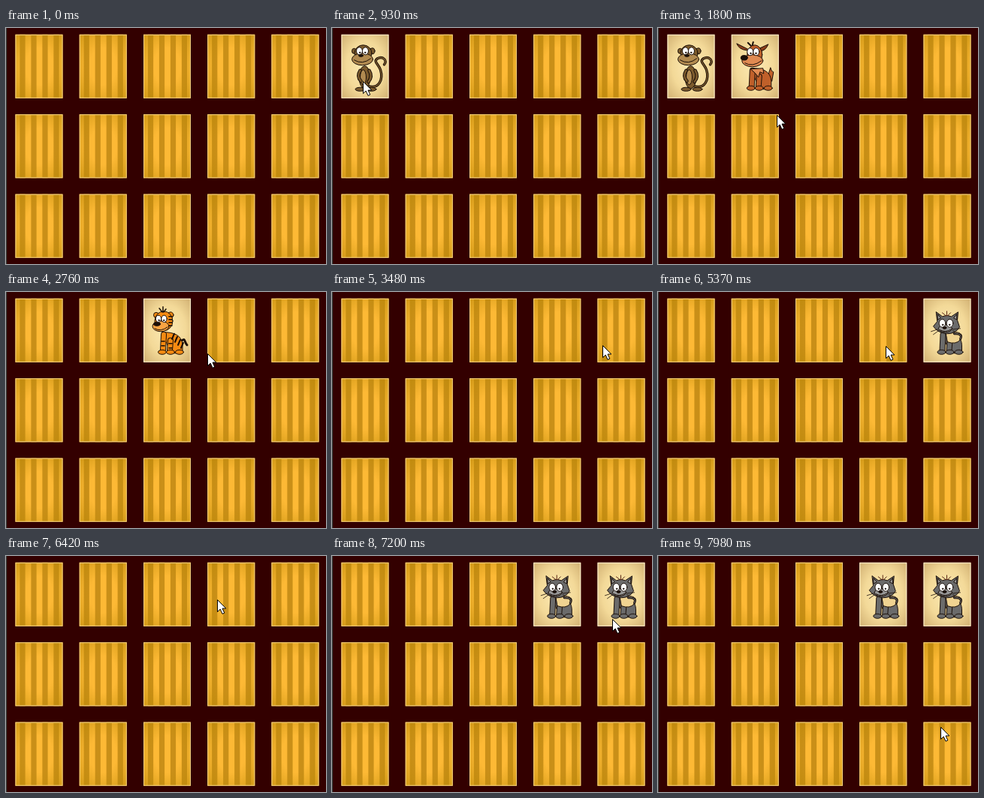
An HTML page for the animation above (8 s loop, 426 by 315 pixels).

```html
<!DOCTYPE html>
<html lang="en">
<head>
<meta charset="utf-8">
<title>Memory cards</title>
<style>
  html, body { margin: 0; width: 100%; height: 100%; overflow: hidden; background: #330000; }
  svg { display: block; width: 100vw; height: 100vh; }
  .art { stroke: #1b0f08; stroke-linejoin: round; stroke-linecap: round; }
</style>
</head>
<body>
<svg viewBox="0 0 426 315">
  <defs>
    <radialGradient id="paper" r=".72">
      <stop offset="0" stop-color="#fdeab4"/>
      <stop offset=".55" stop-color="#f3d998"/>
      <stop offset="1" stop-color="#cfae70"/>
    </radialGradient>
    <radialGradient id="shade" r=".72">
      <stop offset=".4" stop-color="#c08c08" stop-opacity="0"/>
      <stop offset="1" stop-color="#b88604" stop-opacity=".65"/>
    </radialGradient>
  </defs>
  <rect width="426" height="315" fill="#330000"/>
  <rect width="1" height="315" fill="#3b4440"/>
  <g id="cards"></g>
  <path id="cursor" d="M.5 .5V16.5L4.2 13L7 19.3L9.8 18L7 12H11.8Z" fill="#fff" stroke="#000"/>
</svg>
<script>
const LOOP = 8000, FLIP = 90, MISMATCH_DELAY = 540, LONGEST_MOVE = 480;
const CARD = { width: 63, height: 85, columnStep: 85.25, rowStep: 106.5, left: 12.5, top: 8.75 };
const INK = "#1b0f08";

// Drawing helpers
const oval = (x, y, rx, ry, fill) => `<ellipse cx="${x}" cy="${y}" rx="${rx}" ry="${ry}" fill="${fill}"/>`;
const shape = (d, fill) => `<path d="${d}" fill="${fill}"/>`;
const line = (d, width = 1, color = INK) =>
  `<path d="${d}" fill="none" stroke="${color}" stroke-width="${width}"/>`;
const limb = (d, width, color) => line(d, width + 2) + line(d, width, color);
const eyes = (x, y, gap, size = 4) => [x, x + gap].map((ex, i) =>
  oval(ex, y, size, size * 1.25, "#fff") + oval(ex + .6 - i, y + 2, .7, .8, INK)).join("");
const sitting = (x, fill) =>
  shape(`M${x - 3} 45Q${x + 23} 44 ${x + 24} 62V73H${x + 9}Z`, fill) +
  [[8, 56], [-1, 48]].map(([dx, y]) => limb(`M${x + dx} ${y}L${x + dx - 1} 69`, 6, fill)).join("") +
  [20, 8, -3].map(dx => oval(x + dx, 71.5, 5.5, 3, fill)).join("");

const animals = {
  monkey() {
    const fur = "#7c5b2d", skin = "#b18a50";
    return limb("M36 69C50 73 56 60 52 47C49 39 42 36 48 32C55 28 62 35 57 40", 1.4, fur) +
      oval(31, 57, 7.5, 15, fur) + oval(29, 57, 4, 10, skin) +
      limb("M25 48Q20 56 26 62M37 48Q42 56 36 63", 2.5, fur) +
      oval(25, 73, 6.5, 2.5, fur) + oval(40, 73, 6.5, 2.5, fur) +
      oval(17, 22, 3, 3.5, fur) + oval(41, 22, 3.5, 4, fur) +
      oval(29, 25, 11.5, 11, fur) + oval(28, 33, 14, 8, skin) +
      eyes(24, 22, 8) + oval(26, 28, 3, 1.6, INK) + line("M17 34Q28 41 39 32");
  },
  dog() {
    const fur = "#c0602a", dark = "#8d3f1c", pale = "#e08a52";
    return shape("M48 58Q50 50 52 44Q53 50 56 50L54 62Z", fur) + sitting(29, fur) +
      shape("M26 46L42 45L43 52L38 50L36 57L32 52Z", pale) +
      shape("M23 20L7 12Q10 20 20 21ZM36 19L49 13Q45 23 37 22Z", dark) +
      oval(31, 27, 10, 13, fur) + oval(28, 35, 14, 8, pale) +
      eyes(25, 23, 8) + oval(17, 31, 4.5, 3.2, INK) +
      line("M18 38Q28 44 40 35") + line("M26 15L22 11M28 14L29 10", 2);
  },
  tiger() {
    const fur = "#f58a12", stripes = [0, 1, 2, 3];
    return line("M50 57C56 51 54 58 58 62", 3) + sitting(28, fur) +
      stripes.map(i => line(`M${41 + i * 4} ${47 + i * 4}l-3 7`, 2)).join("") +
      stripes.map(i => line(`M${24 + i % 2 * 10} ${57 + i * 3}h4`, 1.7)).join("") +
      oval(17, 22, 3.5, 3.5, fur) + oval(36, 22, 4, 4, fur) +
      oval(27, 30, 12, 13, fur) + oval(23, 37, 11, 7, "#f9a443") +
      eyes(20, 27, 7.5, 3.7) + oval(18, 34, 4.5, 2.4, INK) +
      line("M15 40Q23 45 32 38") + line("M25 18L21 13M26 18V11M27 18L30 14", 1.5) +
      stripes.map(i => line(`M34 ${24 + i * 4}h4`, 1.7)).join("");
  },
  cat() {
    const fur = "#6b6b6b", pale = "#969696";
    return sitting(27, fur) + shape("M30 46Q52 44 49 55Q43 62 32 58Z", "#f0d391") +
      limb("M41 47Q53 46 49 54", 1, fur) +
      shape("M17 18L25 24Q31 21 37 24L46 18L45 29L48 38Q43 47 31 47Q19 46 13 37L18 31Z", fur) +
      shape("M19 21L23 26L19 28ZM44 21L40 26L44 28Z", pale) + oval(29, 40, 9, 5, pale) +
      eyes(25, 33, 10, 4.3) + oval(28, 39, 2.5, 1.6, INK) + line("M22 42Q29 46 37 41") +
      line("M19 41L10 44M20 43L13 48M39 41L49 40M39 43L48 46", .8) +
      line("M30 23L25 19M31 23V17M32 23L36 19", 1, "#5c2815");
  }
};

const frame = (fill, border, inside) =>
  `<rect width="${CARD.width}" height="${CARD.height}" fill="${fill}"/>${inside}
   <rect x=".5" y=".5" width="${CARD.width - 1}" height="${CARD.height - 1}" fill="none" stroke="${border}"/>`;
const backArt = frame("#fdb935", "#f0d082",
  line("M9.5 0V85m15 0V0m15 0V85m15 0V0", 7.2, "#c98f18") +
  `<rect width="${CARD.width}" height="${CARD.height}" fill="url(#shade)"/>`);
const frontArt = name => frame("url(#paper)", "#fff3d2", `<g class="art">${animals[name]()}</g>`);

// Pointer script: it turns a card over wherever it picks one.
const corner = i => ({
  x: CARD.left + i % 5 * CARD.columnStep,
  y: CARD.top + Math.floor(i / 5) * CARD.rowStep
});
const move = (time, x, y) => ({ time, x, y });
const pick = (time, card) => ({ time, card, x: corner(card).x + 20, y: corner(card).y + 62 });
const stops = [
  move(90, 331, 167), move(255, -14, 121), move(410, -12, 93),
  pick(780, 0), pick(1320, 1), move(1800, 158, 116),
  pick(2400, 2), move(2760, 268, 82), pick(2835, 3),
  pick(3600, 4), move(4200, 379, 160), pick(4290, 9),
  pick(5100, 4), move(5370, 303, 72), pick(5560, 2),
  move(6420, 281, 58), pick(6480, 3), pick(7020, 4),
  move(7500, 371, 112), move(LOOP - 20, 376, 228)
];

const dealt = { 0: "monkey", 1: "dog", 2: "tiger", 3: "cat", 4: "cat", 9: "dog" };
const flips = Array.from({ length: 15 }, () => []);
const picks = stops.filter(stop => "card" in stop);
for (let i = 0; i < picks.length; i += 2) {
  const pair = picks.slice(i, i + 2);
  const differ = dealt[pair[0].card] !== dealt[pair[1].card];
  for (const { card, time } of pair) {
    flips[card].push(time);
    if (differ) flips[card].push(pair[1].time + MISMATCH_DELAY);
  }
}

const cardLayer = document.getElementById("cards");
cardLayer.innerHTML = flips.map((_, i) => {
  const { x, y } = corner(i);
  const front = dealt[i] ? `<g>${frontArt(dealt[i])}</g>` : "";
  return `<g transform="translate(${x} ${y})"><g><g>${backArt}</g>${front}</g></g>`;
}).join("");

function drawCard(i, t) {
  const body = cardLayer.children[i].firstChild;
  const [back, front] = body.children;
  let open = false, scale = 1;
  for (const start of flips[i]) {
    const p = (t - start) / FLIP;
    if (p >= .5) open = !open;
    if (p > 0 && p < 1) scale = Math.max(.04, Math.abs(1 - 2 * p));
  }
  body.setAttribute("transform", `translate(${CARD.width / 2 * (1 - scale)} 0) scale(${scale} 1)`);
  back.style.display = open ? "none" : "";
  front.style.display = open ? "" : "none";
}

const cursor = document.getElementById("cursor");
function drawCursor(t) {
  const from = stops.findLast(stop => stop.time <= t);
  cursor.style.display = from ? "" : "none";
  if (!from) return;
  const to = stops.find(stop => stop.time > t) || from;
  const start = Math.max(from.time, to.time - LONGEST_MOVE);
  const p = to === from ? 1 : Math.max(0, (t - start) / (to.time - start));
  const ease = p * p * (3 - 2 * p);
  const between = axis => Math.round(from[axis] + (to[axis] - from[axis]) * ease);
  cursor.setAttribute("transform", `translate(${between("x")} ${between("y")})`);
}

const begin = performance.now();
function draw() {
  const t = (performance.now() - begin) % LOOP;
  Object.keys(dealt).forEach(i => drawCard(i, t));
  drawCursor(t);
  requestAnimationFrame(draw);
}
draw();
</script>
</body>
</html>
```
